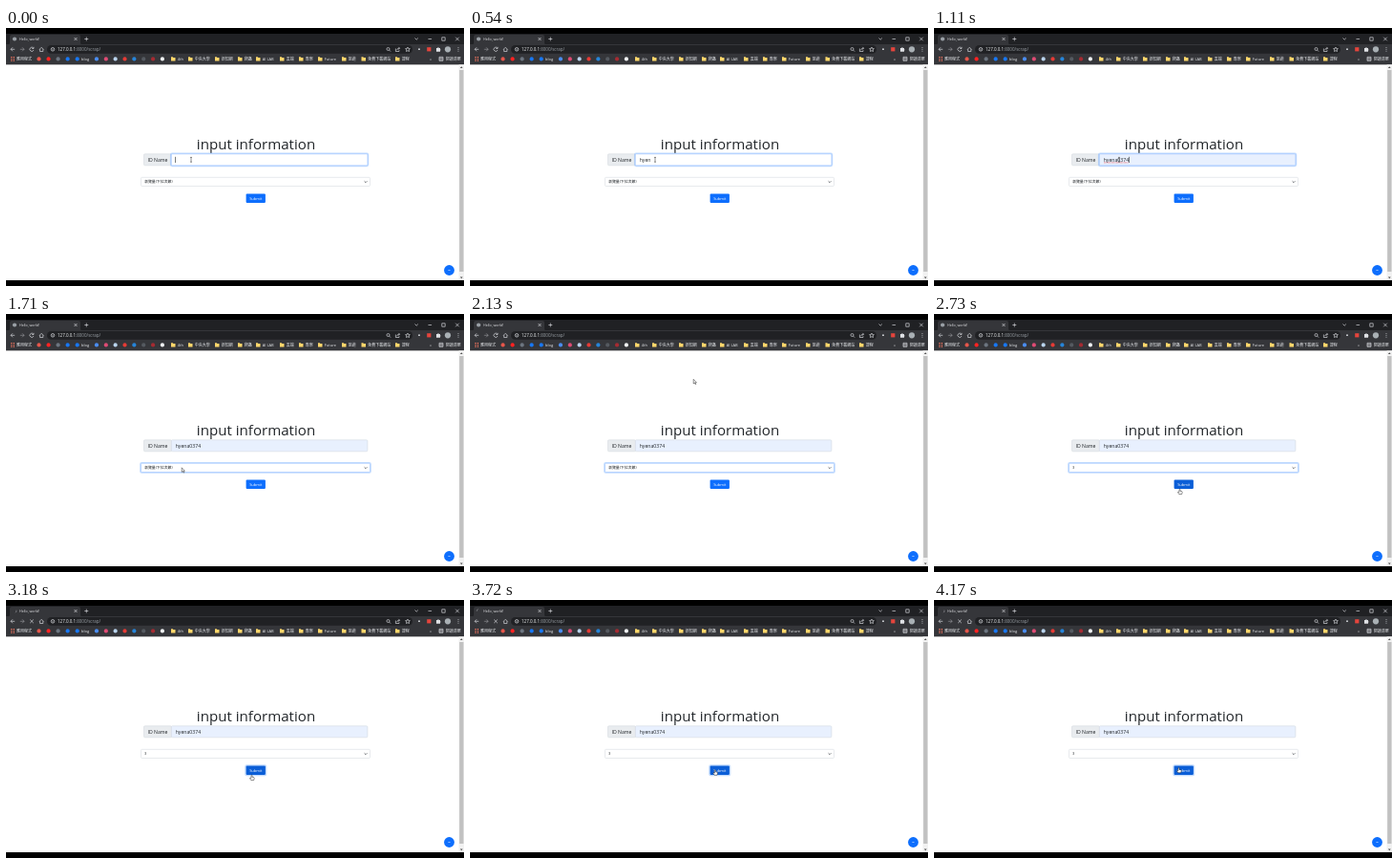
These frames come from a looping animation (480x270 px, 4.26 s). An HTML page:

```html
<!DOCTYPE html>
<html lang="zh-Hant">
<head>
<meta charset="utf-8">
<title>Hello, world!</title>
<style>
html, body { margin: 0; height: 100%; overflow: hidden; background: #000; }
svg { display: block; width: 100vw; height: 100vh; }
text { font-family: "Open Sans", "Noto Sans CJK TC", "Noto Sans CJK", sans-serif; white-space: pre; }
.icon { fill: none; stroke: #dfe1e5; stroke-width: .65; }
.marks text { font-size: 4px; fill: #e8eaed; }
.field { stroke: #ced4da; stroke-width: .5; }
.ring { fill: none; stroke: #86b7fe; stroke-opacity: .5; stroke-width: 1.5; }
.focus .field { stroke: #86b7fe; }
.ring, .caret, .typo { visibility: hidden; }
.focus .ring, .focus .caret, .focus .typo { visibility: visible; }
.hot #face { fill: #0b5ed7; }
.form text { font-size: 5.15px; fill: #212529; }
</style>
</head>
<body>
<svg viewBox="0 0 480 270">
  <rect width="480" height="270"/>
  <rect y="6" width="480" height="12" fill="#202124"/>
  <path d="M2 17.5q2 0 2-2V9q0-2 2-2H76q2 0 2 2v6.5q0 2 2 2z" fill="#35363a"/>
  <rect y="17" width="480" height="21.5" fill="#35363a"/>
  <rect y="38.3" width="480" height="225.7" fill="#fff"/>

  <g id="idle">
    <circle cx="9" cy="11.5" r="2.1" fill="#9aa0a6"/>
    <path class="icon" d="M28.7 21A2.1 2.1 0 1 0 29 23M29 19.8v1.7h-1.8"/>
  </g>
  <g id="busy">
    <path id="spin" class="icon" d="M9 9.6a1.9 1.9 0 0 1 1.9 1.9" stroke-opacity=".5"/>
    <path class="icon" d="M25.2 20.5l3.6 3.6m0-3.6l-3.6 3.6"/>
  </g>
  <text x="14" y="12.9" font-size="3.6" fill="#e8eaed">Hello, world!</text>
  <path class="icon" d="M71.5 10l3 3m0-3l-3 3M82.3 11.5h4m-2-2v4M428.5 10.5l1.7 1.7 1.7-1.7M442.5 11.5h3.6M456.8 9.8h3.4v3.4h-3.4zM471.2 9.7l3.6 3.6m0-3.6l-3.6 3.6"/>
  <path class="icon" d="M9.2 22.3H5m2-2l-2 2 2 2M35 22.5l2.2-2.2 2.2 2.2m-3.8-.4v2.4h3.2v-2.4"/>
  <path class="icon" d="M14.8 22.3H19m-2-2l2 2-2 2" stroke-opacity=".55"/>

  <rect x="43" y="18" width="383" height="8.7" rx="4.3" fill="#202124"/>
  <circle class="icon" cx="49" cy="22.3" r="1.8"/>
  <path class="icon" d="M49 22v1.4m0-2.4v.4"/>
  <text x="54" y="24" font-size="4.5" fill="#f1f3f4">127.0.0.1<tspan fill="#9aa0a6">:8000/scrap/</tspan></text>
  <circle class="icon" cx="400.5" cy="22" r="1.5"/>
  <path class="icon" d="M401.6 23.1l1.5 1.5M408.4 21.5v3h3.6v-1.3m-2.3 0q0-2 2.7-2m-1-1.3l1.2 1.3-1.2 1.3M421 20l.7 1.5 1.7.2-1.2 1.1.3 1.7-1.5-.8-1.5.8.3-1.7-1.2-1.1 1.7-.2z"/>
  <circle cx="433" cy="22.2" r=".9" fill="#dfe1e5"/>
  <rect x="441.2" y="20.2" width="4.2" height="4.2" fill="#e5443c"/>
  <path d="M451 21h1.3q.7-1.8 1.4 0H455v1.3q1.6.6 0 1.3v1.2h-4z" fill="#dfe1e5"/>
  <circle cx="463" cy="22.3" r="3.1" fill="#a9b0b4"/>
  <path d="M474 20v5" stroke="#dfe1e5" stroke-width=".8" stroke-dasharray=".8 1.1"/>

  <g id="marks" class="marks">
    <path d="M5 30.5h4m-4 1.8h4m-4 1.8h4" stroke="#e06f5c" stroke-width="1.1" stroke-dasharray="1 .5"/>
    <text x="11" y="34">應用程式</text>
    <text x="444" y="34">»</text>
    <path class="icon" d="M454 30.3h4v4h-4zm0 1.4h4m-4 1.4h4"/>
    <text x="460.7" y="34">閱讀清單</text>
  </g>

  <rect x="474.6" y="38.3" width="5.4" height="225.7" fill="#f1f1f1"/>
  <rect x="475.2" y="44" width="4.3" height="211" fill="#c1c1c1"/>
  <path d="M475.9 42l1.4-1.7 1.4 1.7zM475.9 260.6l1.4 1.7 1.4-1.7z" fill="#505050"/>

  <text x="262" y="127.4" font-size="15.1" text-anchor="middle" fill="#212529">input information</text>
  <g id="name" class="form">
    <rect class="field" x="144.5" y="131.8" width="29" height="12" rx="1" style="stroke:#ced4da" fill="#e9ecef"/>
    <text x="148.5" y="139.7">ID Name</text>
    <rect class="ring" x="172.7" y="131.2" width="206.8" height="13.2" rx="1.4"/>
    <rect id="box" class="field" x="173.3" y="131.8" width="205.6" height="12" rx="1"/>
    <text id="typed" x="177.7" y="139.7"></text>
    <path id="typo" d="M178 140.9h26" stroke="#e33" stroke-width=".6" stroke-dasharray=".8 .5"/>
    <rect id="caret" class="caret" y="134.8" width=".6" height="6.2" fill="#212529"/>
  </g>
  <g id="pick">
    <rect class="ring" x="140.9" y="155.7" width="241.2" height="10.4" rx="1.4"/>
    <rect class="field" x="141.5" y="156.3" width="240" height="9.2" rx="1" fill="#fff"/>
    <text id="choice" x="145" y="162.4" font-size="3.9" fill="#212529"></text>
    <path d="M375.6 160.3l1.4 1.4 1.4-1.4" fill="none" stroke="#343a40" stroke-width=".7"/>
  </g>
  <g id="send">
    <rect class="ring" x="251" y="173" width="21.5" height="10.6" rx="1.4"/>
    <rect id="face" x="251.6" y="173.6" width="20.3" height="9.4" rx="1" fill="#0d6efd"/>
    <text x="261.8" y="179.7" font-size="4" text-anchor="middle" fill="#fff">Submit</text>
  </g>
  <circle cx="464.5" cy="253.5" r="5.4" fill="#0d6efd"/>
  <path d="M463.5 254l1-1 1 1" fill="none" stroke="#fff" stroke-width=".6"/>

  <g id="mouse" stroke="#222" stroke-width=".5">
    <path id="beam" d="M-1-2.4H1M0-2.4V2.4M-1 2.4H1" fill="none"/>
    <path id="arrow" d="M0 0V4.6L1.1 3.6 1.9 5.3 2.6 5 1.9 3.4H3.2z" fill="#fff"/>
    <path id="hand" d="M-.5.5Q0-.4.5.5V2.2L2.4 2.7Q2.9 2.9 2.7 3.7L2.2 5.6H-.7L-2 3.5Q-1.8 2.6-.5 3.5z" fill="#fff"/>
  </g>
</svg>
<script>
const $ = id => document.getElementById(id);
const LOOP = 4260, NAME = "hyena0374";
const BLUR = 1620, CHOOSE = 2340, CLICK = 2940;

const add = (tag, attrs, text = "") => {
  const el = document.createElementNS("http://www.w3.org/2000/svg", tag);
  for (const key in attrs) el.setAttribute(key, attrs[key]);
  el.textContent = text;
  $("marks").append(el);
};

// Bookmark bar: plain site icons, then labelled folders
["#e5564b", "#f22", "#6c7580", "#1877f2", "#1877f2", "#4b8df0", "#df4b74", "#b9d3ec",
 "#e53b35", "#2684d8", "#555a60", "#a52b32", "#f1f3f4"].forEach((fill, i) =>
  add("circle", { cx: 34.5 + i * 10.05 + (i > 4 ? 10.2 : 0) - (i > 5 ? 0.2 * (i - 5) : 0), cy: 32.4, r: 2.1, fill }));
add("text", { x: 79, y: 34 }, "blog");
[[173, "4th"], [191, "中央大學"], [219, "新知網"], [243, "爬蟲"], [262, "AI LAB"], [287, "雲端"], [307, "專案"],
 [327, "Future"], [352, "旅遊"], [372.5, "免費下載網站"], [408, "課程"]].forEach(([x, label]) => {
  add("path", { d: `M${x} 30.2h1.8l.6.7h2.1v3.7h-4.5z`, fill: "#fbd66b" });
  add("text", { x: x + 6.8, y: 34 }, label);
});

// Pointer path: time, x, y
const path = [[0, 194, 137.8], [1350, 194, 137.8], [1650, 184.2, 160.8], [1890, 184.2, 160.8],
  [2130, 234.2, 68.3], [2340, 234.2, 68.3], [2700, 257.5, 183], [3420, 257.5, 183], [3900, 256.5, 175.2]];

function pointer(t) {
  const i = path.findIndex(p => p[0] > t);
  if (i < 0) return path.at(-1).slice(1);
  const [t0, x0, y0] = path[i - 1], [t1, x1, y1] = path[i];
  const u = (t - t0) / (t1 - t0), e = u * u * (3 - 2 * u);
  return [x0 + (x1 - x0) * e, y0 + (y1 - y0) * e];
}

function typedCount(t) {
  if (t < 330) return 0;
  if (t < 810) return Math.min(5, 1 + Math.floor((t - 330) / 60));
  return Math.min(9, 6 + Math.floor((t - 810) / 50));
}

const show = (id, on) => { $(id).style.display = on ? "" : "none"; };
const mark = (id, name, on) => $(id).classList.toggle(name, on);

function draw(t) {
  const count = typedCount(t), full = count === NAME.length;
  const [x, y] = pointer(t);
  const overInput = x > 173 && y > 131 && y < 145, overButton = y > 173;
  const loading = t >= CLICK;

  $("typed").textContent = NAME.slice(0, count);
  $("caret").setAttribute("x", 177.3 + (count ? $("typed").getComputedTextLength() + .4 : 0));
  $("box").setAttribute("fill", full ? "#e8f0fe" : "#fff");
  show("typo", full && t < BLUR);
  show("caret", t % 1060 < 530 || (t > 810 && t < 1060));
  mark("name", "focus", t < BLUR);

  $("choice").textContent = t < CHOOSE ? "瀏覽量(下拉次數)" : "3";
  mark("pick", "focus", t >= BLUR && !loading);
  mark("send", "focus", loading);
  mark("send", "hot", overButton || loading);

  show("idle", !loading);
  show("busy", loading);
  $("spin").setAttribute("transform", `rotate(${t * .36} 9 11.5)`);

  $("mouse").setAttribute("transform", `translate(${x} ${y})`);
  show("beam", overInput);
  show("hand", overButton);
  show("arrow", !overInput && !overButton);
}

const start = performance.now();
function tick() {
  draw((performance.now() - start) % LOOP);
  requestAnimationFrame(tick);
}
tick();
</script>
</body>
</html>
```
